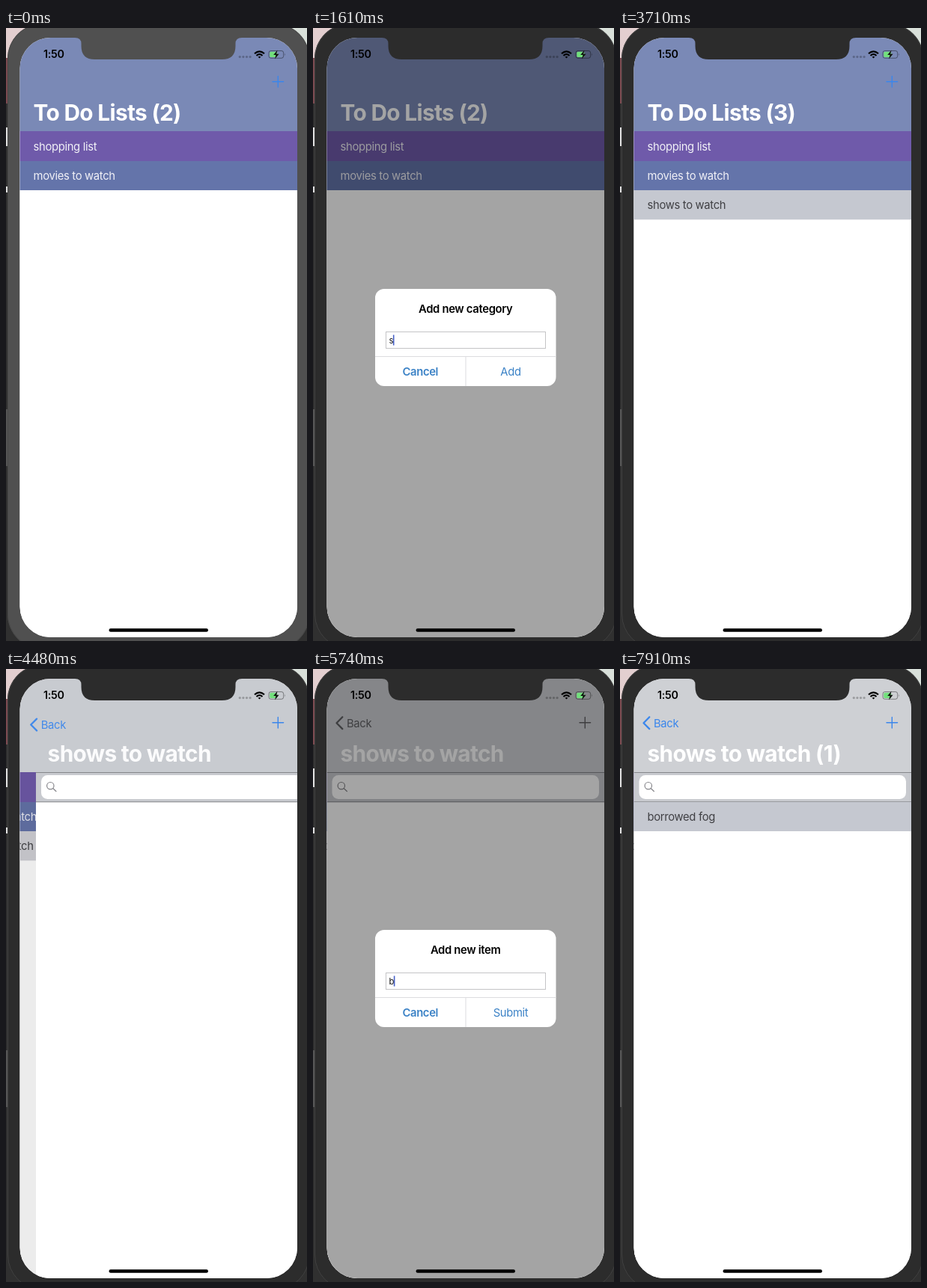
Recreate the animation shown at these times as an HTML page. Size 402 px wide and 820 px high, loop 8000 ms.

```html
<!DOCTYPE html>
<html lang="en">
<head>
<meta charset="utf-8">
<title>To do lists</title>
<style>
  html, body { margin: 0; width: 100%; height: 100%; overflow: hidden; background: #2c2c2c; }
  svg { display: block; width: 402px; height: 820px; }
  text { font: 400 14.8px Inter, "Liberation Sans", sans-serif; letter-spacing: -.022em; white-space: pre; }
  .title { font-size: 29.8px; font-weight: 700; fill: #fff; }
  .row { fill: #f1f1f7; }
  .dark { fill: #404044; }
  .bold { font-weight: 600; }
  .mid { text-anchor: middle; }
  .small { font-size: 11.3px; letter-spacing: -.008em; }
  .button { fill: #3b82c6; }
  .line { fill: none; stroke-linecap: round; stroke-linejoin: round; }
</style>
</head>
<body>
<svg viewBox="0 0 402 820">
  <defs>
    <clipPath id="screenClip"><rect x="18.5" y="13" width="370.5" height="802" rx="41"/></clipPath>
    <clipPath id="boxClip"><rect x="83" y="349" width="241.5" height="130" rx="12"/></clipPath>
  </defs>

  <!-- desktop behind the phone -->
  <rect width="402" height="820" fill="#303030"/>
  <rect width="60" height="40" fill="#e3cfd0"/>
  <rect y="40" width="4" height="61" fill="#7b4a50"/>
  <rect y="133" width="2" height="25" fill="#ddd"/>
  <rect y="212" width="2" height="8" fill="#ddd"/>
  <rect y="510" width="2" height="76" fill="#555"/>
  <rect x="340" width="62" height="40" fill="#d9e0da"/>

  <rect id="bezel" x="2" y="-6" width="403.5" height="837" rx="47"/>
  <rect x="2.5" y="-5.5" width="402.5" height="836" rx="46.5" fill="none" stroke="#474747" stroke-width=".8"/>

  <g clip-path="url(#screenClip)">
    <rect x="18" y="12" width="372" height="804" fill="#fff"/>

    <g id="listPage">
      <rect x="18" y="138" width="372" height="678" fill="#fff"/>
      <rect x="18" y="138" width="372" height="40" fill="#6f5aaa"/>
      <text class="row" x="36.5" y="163.5">shopping list</text>
      <rect x="18" y="178" width="372" height="39" fill="#6474aa"/>
      <text class="row" x="36.5" y="203">movies to watch</text>
      <g id="newRow">
        <rect id="newRowBack" x="18" y="217" width="372" height="39.3"/>
        <text class="dark" x="36.5" y="242">shows to watch</text>
      </g>
      <rect id="shade" x="18" y="138" width="372" height="678"/>
    </g>

    <g id="itemPage">
      <rect x="18.5" y="138" width="372" height="678" fill="#fff"/>
      <rect x="18.5" y="138" width="372" height="40" fill="#c8cacf"/>
      <path d="M18.5 138.5h372M18.5 177.8h372" stroke="#85878b" stroke-width="1"/>
      <rect x="25.5" y="142" width="356.5" height="32" rx="8.5" fill="#fff"/>
      <g class="line" stroke="#85858a" stroke-width="1.2">
        <circle cx="37.8" cy="156.2" r="4.7"/><path d="M41.3 159.7l4.2 4"/>
      </g>
      <g id="itemRow">
        <rect x="18.5" y="178" width="372" height="39" fill="#c5c8d0"/>
        <text class="dark" x="36.5" y="203">borrowed fog</text>
      </g>
    </g>

    <rect id="bar" x="18" y="12" width="372" height="126"/>
    <text id="listTitle" class="title" x="36.5" y="124.3"></text>
    <text id="itemTitle" class="title" x="36.5" y="124.3"></text>
    <g id="back">
      <path id="chevron" class="line" d="M39.3 64.3l-7.8 7.9 7.8 7.9" stroke-width="2.3"/>
      <text id="backText" x="45" y="77.5">Back</text>
    </g>
    <path id="plus" class="line" d="M356 71.8h14.6M363.3 64.5v14.6" stroke-width="1.4"/>

    <rect id="dim" x="18" y="12" width="372" height="804"/>

    <g id="alert">
      <rect x="83" y="349" width="241.5" height="130" rx="12" fill="#fff"/>
      <rect id="press" x="204" y="439" width="121" height="40" fill="#e4e4e4" clip-path="url(#boxClip)"/>
      <text id="heading" class="bold mid" x="203.7" y="381.3"></text>
      <rect x="97.5" y="406.5" width="213" height="22" fill="#fff" stroke="#c4c4c6"/>
      <text id="hint" class="small" x="101.5" y="421.8" fill="#c7c7cc"></text>
      <text id="typed" class="small" x="101.5" y="421.8" fill="#111"></text>
      <rect id="caret" y="410.5" width="1.6" height="14" fill="#4660c8"/>
      <path d="M83 439.5h241.5M204 439.5v39.5" stroke="#dcdcdf" stroke-width="1"/>
      <text class="button bold mid" x="143.3" y="465.2">Cancel</text>
      <text id="confirm" class="button mid" x="264" y="465.2"></text>
    </g>
  </g>

  <path id="notch" d="M92 12V13Q100.500 13 100.500 21V24Q100.500 42 118.500 42H288.500Q306.500 42 306.500 24V21Q306.500 13 315 13V12Z"/>

  <!-- status bar -->
  <text class="bold" x="50" y="40.3" style="font-size:14.3px">1:50</text>
  <g fill="#000" fill-opacity=".25">
    <circle cx="312.3" cy="38.600" r="1.6"/><circle cx="316.900" cy="38.600" r="1.6"/>
    <circle cx="321.500" cy="38.600" r="1.6"/><circle cx="326.100" cy="38.600" r="1.6"/>
  </g>
  <g fill="none" stroke="#000" stroke-width="2.2">
    <path d="M332 34.300q6.500-6 13 0M334.500 37q4-3.600 8 0"/>
    <path d="M338.500 40.600l-2-2q2-1.400 4 0z" fill="#000" stroke="none"/>
  </g>
  <rect x="351" y="30.500" width="19.700" height="9.800" rx="2.800" fill="none" stroke="#000" stroke-opacity=".4"/>
  <path d="M372.300 33.700q1.500 1.700 0 3.400z" fill-opacity=".4"/>
  <rect x="352.300" y="31.800" width="10" height="7.200" rx="1.500" fill="#72e07c"/>
  <path d="M362.500 29.500l-5.300 6.500h3.300l-1.500 5.500 5.600-6.800h-3.400z" fill="#111"/>
  <rect x="137.500" y="803.300" width="132.500" height="4.500" rx="2.250"/>
</svg>

<script>
const LOOP = 8000, TICK = 70;
const ui = {};
document.querySelectorAll('svg [id]').forEach(el => ui[el.id] = el);

const PUSH = 4230;
const dialogs = [
  { tap: 700, open: 910, type: 1540, pace: 105, press: 3060, close: 3200, done: 3570,
    heading: 'Add new category', hint: 'Enter category', text: 'shows to watch', confirm: 'Add' },
  { tap: 5040, open: 5230, type: 5740, pace: 100, press: 6980, close: 7090, done: 7490,
    heading: 'Add new item', hint: 'Enter item', text: 'borrowed fog', confirm: 'Submit' }
];

const clamp = v => Math.max(0, Math.min(1, v));
const mix = (a, b, k) => `rgb(${a.map((v, i) => Math.round(v + (b[i] - v) * k))})`;
const set = (el, attrs) => { for (const k in attrs) el.setAttribute(k, attrs[k]); };
const show = (el, on) => set(el, { opacity: +on });

// critically damped spring, 0 to 1
function spring(ms) {
  const x = Math.max(0, ms) * .01826;
  return 1 - (1 + x) * Math.exp(-x);
}

function drawDialog(d, t, level) {
  const scale = 1.2 - .2 * spring(t - d.open);
  const count = Math.max(0, Math.min(d.text.length, Math.floor((t - d.type) / d.pace) + 1));
  ui.heading.textContent = d.heading;
  ui.confirm.textContent = d.confirm;
  ui.hint.textContent = count ? '' : d.hint;
  ui.typed.textContent = d.text.slice(0, count);
  const width = count ? ui.typed.getComputedTextLength() : 0;
  set(ui.caret, { x: 101 + width });
  show(ui.press, t >= d.press && t < d.close + 140);
  set(ui.alert, {
    opacity: level,
    transform: `translate(203.7 414) scale(${scale}) translate(-203.7 -414)`
  });
}

function render(t) {
  const d = dialogs[t < PUSH ? 0 : 1];
  const level = spring(t - d.open) * (1 - spring(t - d.close));
  const push = spring(t - PUSH), rest = 1 - push, pushed = t >= PUSH;

  const body = mix([80, 80, 80], [44, 44, 44], clamp(t / 210));
  set(ui.bezel, { fill: body });
  set(ui.notch, { fill: body });

  set(ui.listPage, { transform: `translate(${-111 * push} 0)` });
  set(ui.shade, { opacity: .08 * push });
  show(ui.newRow, t >= dialogs[0].done);
  set(ui.newRowBack, { fill: t >= 4060 ? '#d2d2d7' : '#c5c8d0' });
  set(ui.itemPage, { transform: `translate(${371 * rest} 0)`, opacity: +pushed });
  show(ui.itemRow, t >= dialogs[1].done);

  set(ui.bar, { fill: pushed ? mix([200, 203, 208], [206, 208, 212], clamp((t - 4480) / 300)) : '#7a89b6' });
  ui.listTitle.textContent = `To Do Lists (${t < dialogs[0].done ? 2 : 3})`;
  ui.itemTitle.textContent = 'shows to watch' + (t < dialogs[1].done ? '' : ' (1)');
  set(ui.listTitle, { transform: `translate(${-111 * push} 0)`, opacity: clamp(1 - push * 1.3) });
  set(ui.itemTitle, { transform: `translate(${330 * rest} 0)`, opacity: push });

  // tint turns grey behind a dialog
  const tint = mix([58, 134, 236], [96, 96, 100], pushed ? level : 0);
  set(ui.back, { transform: `translate(${30 * rest} ${40 * rest})`, opacity: push });
  set(ui.chevron, { stroke: tint });
  set(ui.backText, { fill: tint });
  const tapped = t >= d.tap && t < d.open ? 1 - .7 * clamp((t - d.tap) / 140) : 1;
  set(ui.plus, { stroke: tint, opacity: pushed ? tapped : tapped * clamp(1 - level * 1.5) });

  set(ui.dim, { opacity: .357 * level });
  drawDialog(d, t, level);
}

function frame(now) {
  const t = now % LOOP;
  render(Math.floor(t / TICK) * TICK);
  requestAnimationFrame(frame);
}
render(0);
requestAnimationFrame(frame);
</script>
</body>
</html>
```
